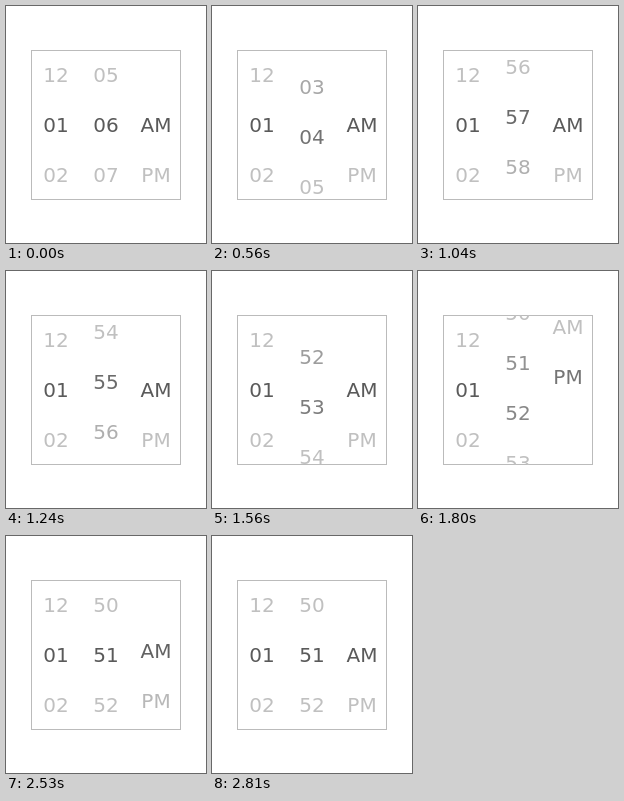
Animation, 200 px wide and 237 px high, one loop 3920 ms. Source, as an HTML page with a canvas:

```html
<!DOCTYPE html>
<html lang="en">
<head>
<meta charset="utf-8">
<title>Time picker</title>
<style>
  html, body { margin: 0; width: 100%; height: 100%; overflow: hidden; background: #fff; }
  canvas { display: block; }
</style>
</head>
<body>
<canvas id="stage" width="200" height="237"></canvas>
<script>
const ctx = document.getElementById('stage').getContext('2d');
const LOOP = 3920, STEP = 40, ROW = 50, BASE = 126;
const BOX = { x: 25, y: 44, size: 150 };
const DARK = 90, LIGHT = 192;

// Square root of the minutes still to spin: nearly linear, so the wheel brakes evenly.
const BRAKE = [
  [360, Math.sqrt(15)], [440, 3.848], [560, 3.572], [840, 2.921],
  [1240, 2.042], [1560, 1.288], [2040, 0.19], [2120, 0]
];

const clamp = (v, lo = 0, hi = 1) => Math.min(hi, Math.max(lo, v));

function follow(points, t) {
  if (t <= points[0][0]) return points[0][1];
  for (let i = 1; i < points.length; i++) {
    const [t0, v0] = points[i - 1], [t1, v1] = points[i];
    if (t <= t1) return v0 + (v1 - v0) * (t - t0) / (t1 - t0);
  }
  return points[points.length - 1][1];
}

// Moves one row, overshoots, then settles.
function flick(t, start) {
  const u = clamp((t - start) / 400);
  return u < 0.5
    ? 1.26 * Math.sin(Math.PI * u) ** 1.5
    : 1 + 0.26 * (2 - 2 * u) ** 2;
}

const pad = n => String(n).padStart(2, '0');
const hour = i => pad((i + 11) % 12 + 1);
const minute = i => pad((i + 60) % 60);
const half = i => ['AM', 'PM'][i] || '';

function wheel(x, pos, label) {
  const mid = Math.round(pos);
  for (let i = mid - 2; i <= mid + 2; i++) {
    const d = i - pos;
    const shade = Math.round(DARK + (LIGHT - DARK) * clamp(Math.abs(d)));
    ctx.fillStyle = `rgb(${shade},${shade},${shade})`;
    ctx.fillText(label(i), x, BASE + d * ROW);
  }
}

function draw(t) {
  const tick = t < 2450
    ? Math.min(Math.floor(t / STEP) * STEP, 2120)
    : 2450 + Math.floor((t - 2450) / STEP) * STEP;

  ctx.fillStyle = '#fff';
  ctx.fillRect(0, 0, 200, 237);
  ctx.strokeStyle = '#bbb';
  ctx.strokeRect(BOX.x + 0.5, BOX.y + 0.5, BOX.size - 1, BOX.size - 1);

  ctx.save();
  ctx.beginPath();
  ctx.rect(BOX.x, BOX.y, BOX.size, BOX.size);
  ctx.clip();
  ctx.font = '20px "DejaVu Sans", sans-serif';
  ctx.textAlign = 'center';
  wheel(50, 1, hour);
  wheel(100, follow(BRAKE, tick) ** 2 - 9, minute);
  wheel(150, flick(tick, 1600) - flick(tick, 2410), half);
  ctx.restore();
}

function frame() {
  draw(performance.now() % LOOP);
  requestAnimationFrame(frame);
}
frame();
</script>
</body>
</html>
```
